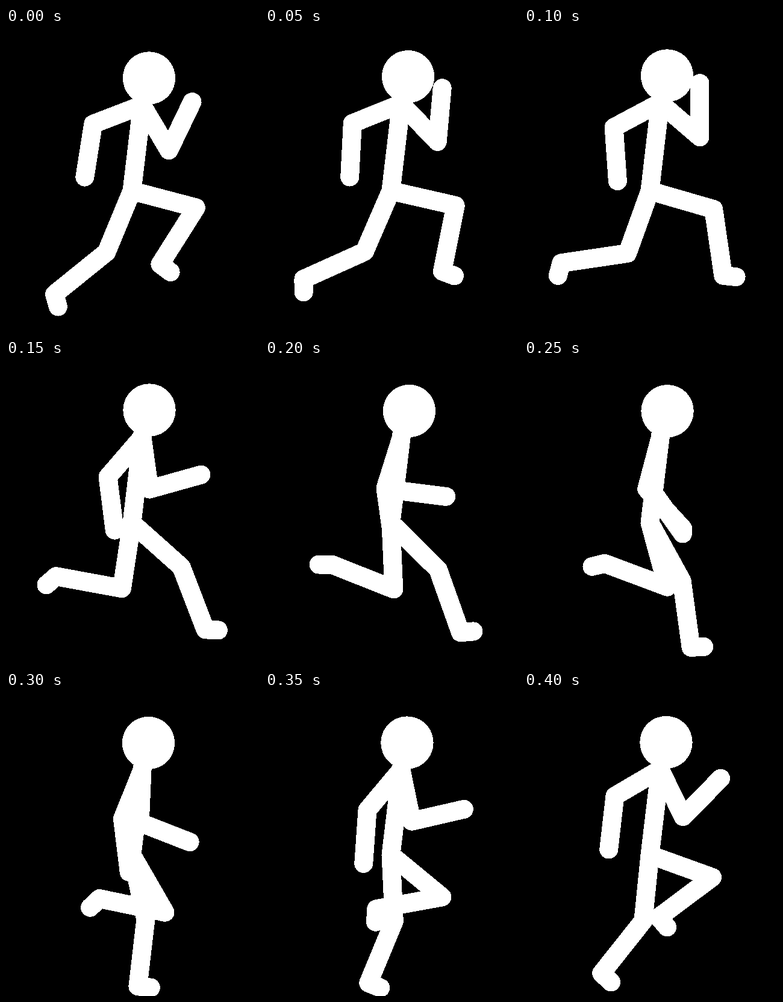
An HTML page for the animation above (450 ms loop, 420 px wide and 504 px high).

```html
<!DOCTYPE html>
<html lang="en">
<head>
<meta charset="utf-8">
<title>Running figure</title>
<style>
  html, body { margin: 0; height: 100%; overflow: hidden; background: #000; }
  svg { display: block; width: 420px; height: 504px; shape-rendering: crispEdges; }
  polyline { fill: none; stroke: #fff; stroke-width: 31; stroke-linecap: round; stroke-linejoin: round; }
</style>
</head>
<body>
<svg viewBox="0 0 420 504">
  <circle id="head" r="43.7" fill="#fff"/>
  <polyline id="torso"/>
  <polyline id="armA"/>
  <polyline id="armB"/>
  <polyline id="legA"/>
  <polyline id="legB"/>
</svg>
<script>
const STEP = 50;          // ms per pose
const STRIDE = 9;         // poses in one stride; left and right swap after each
const HIP = [209, 270];

// Each key: pose index, then values. Limb values are segment angles in degrees, clockwise from right.
const headKeys = [
  [0, 237.5, 83], [2, 237.5, 79], [3, 238, 83], [4, 239.5, 84.5], [6, 236.5, 84.5], [8, 236, 83.5]
];
const arm = {
  lengths: [87, 89],
  keys: [
    [0, 159, 99], [2, 152, 86], [3, 130.8, 82.8], [4, 107.4, 82], [6, 92.5, 21.3], [8, 64, -45.5],
    [9, 59.3, -64.3], [11, 40.7, -90], [12, 82, -15.6], [13, 99, 7.1], [15, 112, 83], [17, 149.6, 96.6]
  ]
};
const leg = {
  lengths: [110, 111, 21.5],
  keys: [
    [0, 14.7, 122.4, 37], [2, 16.1, 81.7, 6], [3, 41.7, 69, 3],
    [4, 44.6, 70.4, -5], [6, 78, 96.7, 6], [8, 95.8, 128.5, 43],
    [9, 112.5, 141.1, 74], [11, 109.8, 171.6, 105], [12, 98.7, 190.4, 139],
    [13, 87.5, 201.6, 180], [15, 60, 191.8, 137], [17, 19.8, 143.3, 49]
  ]
};

// Smooth periodic interpolation (cubic Hermite) through the keys.
function sample(keys, period, pose) {
  const key = i => {
    const turn = Math.floor(i / keys.length);
    const [at, ...values] = keys[i - turn * keys.length];
    return { at: at + turn * period, values };
  };
  let i = 0;
  while (key(i + 1).at <= pose) i++;
  const [a, b, c, d] = [key(i - 1), key(i), key(i + 1), key(i + 2)];
  const span = c.at - b.at;
  const u = (pose - b.at) / span;
  return b.values.map((from, n) => {
    const to = c.values[n];
    const m0 = (to - a.values[n]) / (c.at - a.at) * span;
    const m1 = (d.values[n] - from) / (d.at - b.at) * span;
    const ease = u * u * (3 - 2 * u);
    return from + (to - from) * ease + m0 * u * (1 - u) ** 2 - m1 * u * u * (1 - u);
  });
}

function drawLine(id, points) {
  document.getElementById(id).setAttribute("points", points.join(" "));
}

function drawLimb(id, limb, root, pose) {
  const points = [root];
  sample(limb.keys, 2 * STRIDE, pose).forEach((degrees, n) => {
    const [x, y] = points[n];
    const angle = degrees * Math.PI / 180;
    points.push([x + limb.lengths[n] * Math.cos(angle), y + limb.lengths[n] * Math.sin(angle)]);
  });
  drawLine(id, points);
}

function draw(pose) {
  const [x, y] = sample(headKeys, STRIDE, pose);
  const head = document.getElementById("head");
  head.setAttribute("cx", x);
  head.setAttribute("cy", y);
  const shoulder = [226, y + 45];
  drawLine("torso", [[227.5, y + 34], shoulder, HIP]);
  drawLimb("armA", arm, shoulder, pose);
  drawLimb("armB", arm, shoulder, pose + STRIDE);
  drawLimb("legA", leg, HIP, pose);
  drawLimb("legB", leg, HIP, pose + STRIDE);
}

const start = performance.now();
function tick() {
  draw(Math.floor((performance.now() - start) / STEP) % STRIDE);
  requestAnimationFrame(tick);
}
tick();
</script>
</body>
</html>
```
